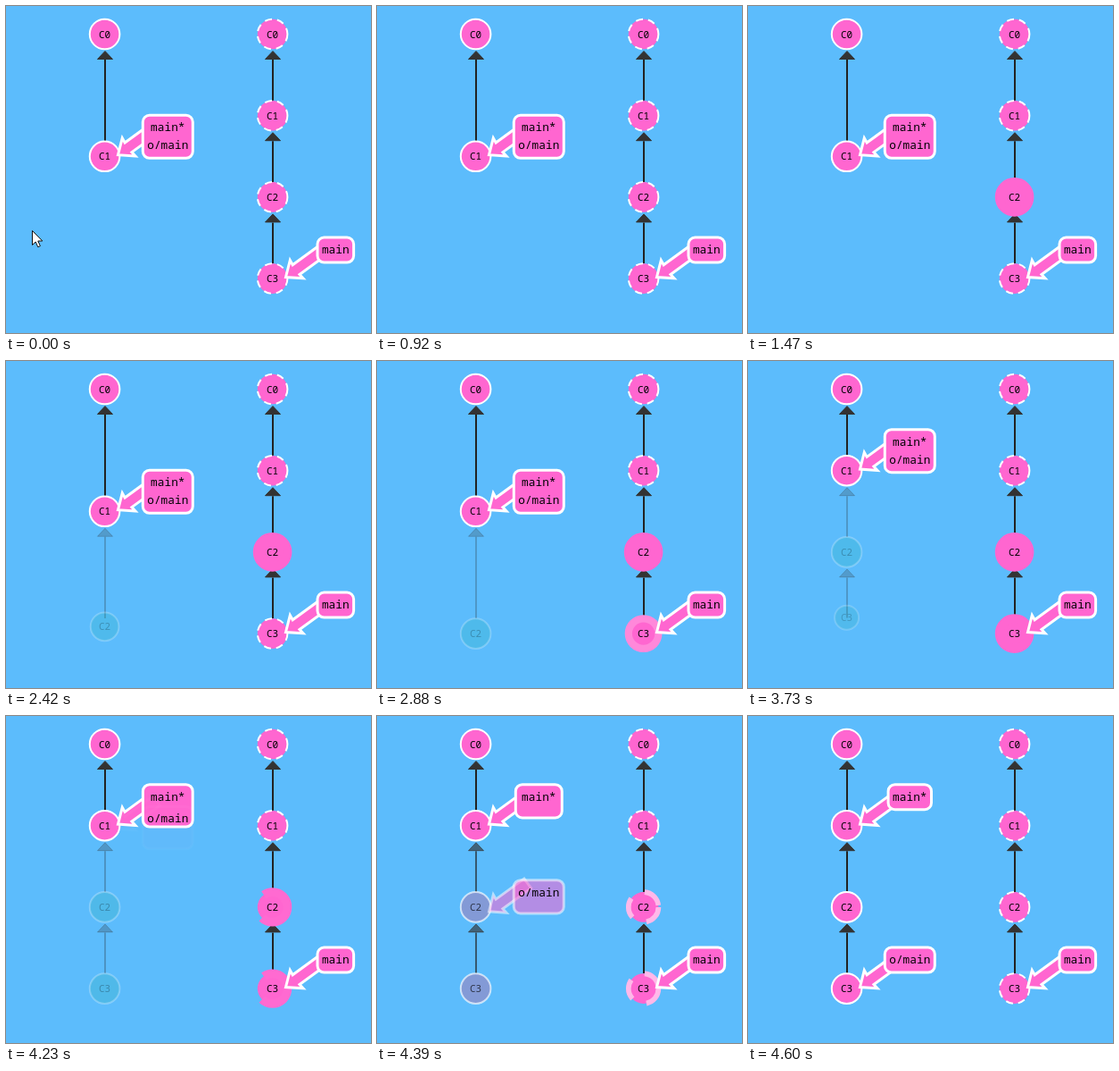
An HTML page with a canvas for the animation above (6.44 s loop, 409 by 366 pixels).

```html
<!DOCTYPE html>
<html lang="en">
<head>
<meta charset="utf-8">
<title>git fetch</title>
<style>
  html, body { margin: 0; width: 100%; height: 100%; overflow: hidden; background: #5cbcfc; }
  canvas { display: block; width: 409px; height: 366px; }
</style>
</head>
<body>
<canvas id="stage"></canvas>
<script>
const W = 409, H = 366, LOOP = 6440;
const BG = '#5cbcfc', INK = '#222222';
const PINK = [255, 102, 208], TEAL = [36, 178, 178], WHITE = [255, 255, 255];
const MONO = '"Noto Sans Mono", "DejaVu Sans Mono", monospace';
const RADIUS = 16.8, STROKE = 2, GLOW = 10, FAINT = 0.24;
const LEFT = 110.6, RIGHT = 298.6;
const TOP = 31.5, STEP = 91.2, BOTTOM = TOP + 3 * STEP;

const canvas = document.getElementById('stage');
const ctx = canvas.getContext('2d');
const dpr = window.devicePixelRatio || 1;
canvas.width = W * dpr;
canvas.height = H * dpr;

const lerp = (a, b, k) => a + (b - a) * k;
const mix = (a, b, k) => a.map((v, i) => lerp(v, b[i], k));
const rgb = c => `rgb(${c.map(Math.round).join(',')})`;
const phase = (t, start, length) => Math.min(1, Math.max(0, (t - start) / length));

function easeInOut(n) {
  if (n <= 0 || n >= 1) return n;
  const q = 0.48 - n / 1.04, root = Math.sqrt(0.1734 + q * q);
  const s = Math.cbrt(root - q) + Math.cbrt(-root - q) + 0.5;
  return (1 - s) * 3 * s * s + s * s * s;
}

function bounce(n) {
  const s = 7.5625, p = 2.75;
  if (n < 1 / p) return s * n * n;
  if (n < 2 / p) return s * (n - 1.5 / p) ** 2 + 0.75;
  if (n < 2.5 / p) return s * (n - 2.25 / p) ** 2 + 0.9375;
  return s * (n - 2.625 / p) ** 2 + 0.984375;
}

function text(str, x, baseline, font) {
  ctx.font = font + ' ' + MONO;
  ctx.textAlign = 'center';
  ctx.fillStyle = '#000';
  ctx.fillText(str, x, baseline);
}

// Line from a child up to its parent, with the arrowhead under the parent.
function edge(cx, parentY, endY, alpha = 1) {
  if (alpha <= 0) return;
  const x = Math.round(cx), tip = parentY + 19;
  ctx.globalAlpha = alpha;
  ctx.strokeStyle = INK;
  ctx.lineWidth = 2;
  ctx.beginPath();
  ctx.moveTo(x, Math.min(tip + 9.5, endY));
  ctx.lineTo(x, endY);
  ctx.stroke();
  ctx.beginPath();
  ctx.moveTo(x, tip);
  ctx.lineTo(x + 8.5, tip + 9);
  ctx.lineTo(x - 8.5, tip + 9);
  ctx.closePath();
  ctx.lineWidth = 1;
  ctx.lineJoin = 'round';
  ctx.fillStyle = ctx.strokeStyle = '#333';
  ctx.fill();
  ctx.stroke();
  ctx.globalAlpha = 1;
}

function node(label, x, y, { r = RADIUS, fill = PINK, stroke = WHITE, width = STROKE, dashed = false, alpha = 1 } = {}) {
  if (alpha <= 0) return;
  ctx.globalAlpha = alpha;
  ctx.beginPath();
  ctx.arc(x, y, Math.max(0, r), 0, Math.PI * 2);
  ctx.fillStyle = rgb(fill);
  ctx.fill();
  ctx.setLineDash(dashed ? [4 * width, 3 * width] : []);
  ctx.strokeStyle = rgb(stroke);
  ctx.lineWidth = width;
  ctx.stroke();
  ctx.setLineDash([]);
  text(label, x, y + 4, '500 11px');
  ctx.globalAlpha = 1;
}

function pointer(x, y) {
  ctx.save();
  ctx.translate(x + 14.5, y - 1.3);
  ctx.rotate(-36 * Math.PI / 180);
  ctx.beginPath();
  ctx.moveTo(0.5, 0);
  for (const [px, py] of [[15.5, -12.5], [14.8, -6.6], [54, -6.6], [54, 6.6], [14.8, 6.6], [15.5, 12.5]]) ctx.lineTo(px, py);
  ctx.closePath();
  ctx.fill();
  ctx.stroke();
  ctx.restore();
}

// Branch tag pointing at the node (x, y); dy shifts the box below its usual place.
function tag(x, y, cx, w, h, dy = 0, alpha = 1) {
  if (alpha <= 0) return;
  ctx.globalAlpha = alpha;
  ctx.fillStyle = rgb(PINK);
  ctx.strokeStyle = '#fff';
  ctx.lineWidth = 3;
  ctx.lineJoin = 'miter';
  pointer(x, y);
  ctx.beginPath();
  ctx.roundRect(cx - w / 2, y - 46 + dy, w, h, 7.5);
  ctx.fill();
  ctx.stroke();
  ctx.globalAlpha = 1;
}

const tagText = (str, cx, y) => text(str, cx, y - 28, '12.8px');

function remote(t, reset) {
  const ys = [0, 1, 2, 3].map(i => TOP + i * STEP);
  for (let i = 0; i < 3; i++) edge(RIGHT, ys[i], ys[i + 1] - 17);
  const starts = { 2: 922, 3: 2525 };
  ys.forEach((y, i) => {
    const start = starts[i];
    const glow = start ? easeInOut(phase(t, start, 528)) * (1 - reset) : 0;
    node('C' + i, RIGHT, y, {
      stroke: mix(WHITE, PINK, glow),
      width: lerp(STROKE, GLOW, glow),
      dashed: !start || t < start || reset > 0
    });
  });
  tag(RIGHT, ys[3], 369.3, 40.6, 28);
  tagText('main', 369.3, ys[3]);
}

function local(t, reset) {
  const shift = easeInOut(phase(t, 3328, 400));
  const y1 = lerp(TOP + 1.5 * STEP, TOP + STEP, shift);
  const y2 = lerp(BOTTOM, TOP + 2 * STEP, shift);
  const born = [
    { label: 'C3', start: 3362, from: TOP + 2 * STEP, to: BOTTOM },
    { label: 'C2', start: 1788, from: y1, to: y2 }
  ];

  edge(LEFT, TOP, y1 - 17);
  for (const b of born) {
    const grow = easeInOut(phase(t, b.start, 400));
    edge(LEFT, b.from, lerp(b.from + 17, b.to - 17, grow), lerp(FAINT * grow, 1, reset));
  }
  for (const b of born) {
    const k = bounce(phase(t, b.start, 800));
    node(b.label, LEFT, lerp(b.from, b.to, k), {
      r: RADIUS * k,
      fill: mix(TEAL, PINK, reset),
      alpha: t < b.start ? 0 : lerp(FAINT * k, 1, reset)
    });
  }
  node('C1', LEFT, y1);
  node('C0', LEFT, TOP);

  const cx = 181.3, line = 20;
  const originY = lerp(y1, BOTTOM, reset);
  const h = lerp(48, 28, reset);
  const drop = line * (1 - reset);
  tag(LEFT, y1, cx, lerp(56, 48.4, reset), h);
  tag(LEFT, originY, cx, 56, h, drop, reset);
  tagText('main*', cx, y1);
  tagText('o/main', cx, originY + drop);
}

function cursor() {
  ctx.beginPath();
  ctx.moveTo(29.5, 251.5);
  for (const [x, y] of [[29.5, 267.5], [33.2, 264], [35.8, 269.8], [38.4, 268.6], [35.8, 263], [40.8, 263]]) ctx.lineTo(x, y);
  ctx.closePath();
  ctx.fillStyle = '#fff';
  ctx.fill();
  ctx.strokeStyle = '#111';
  ctx.lineWidth = 1;
  ctx.lineJoin = 'miter';
  ctx.stroke();
}

function draw(t) {
  ctx.setTransform(dpr, 0, 0, dpr, 0, 0);
  ctx.fillStyle = BG;
  ctx.fillRect(0, 0, W, H);
  const reset = easeInOut(phase(t, 4183, 400));
  remote(t, reset);
  local(t, reset);
  if (t < 40) cursor();
}

function tick() {
  draw(performance.now() % LOOP);
  requestAnimationFrame(tick);
}
tick();
</script>
</body>
</html>
```
